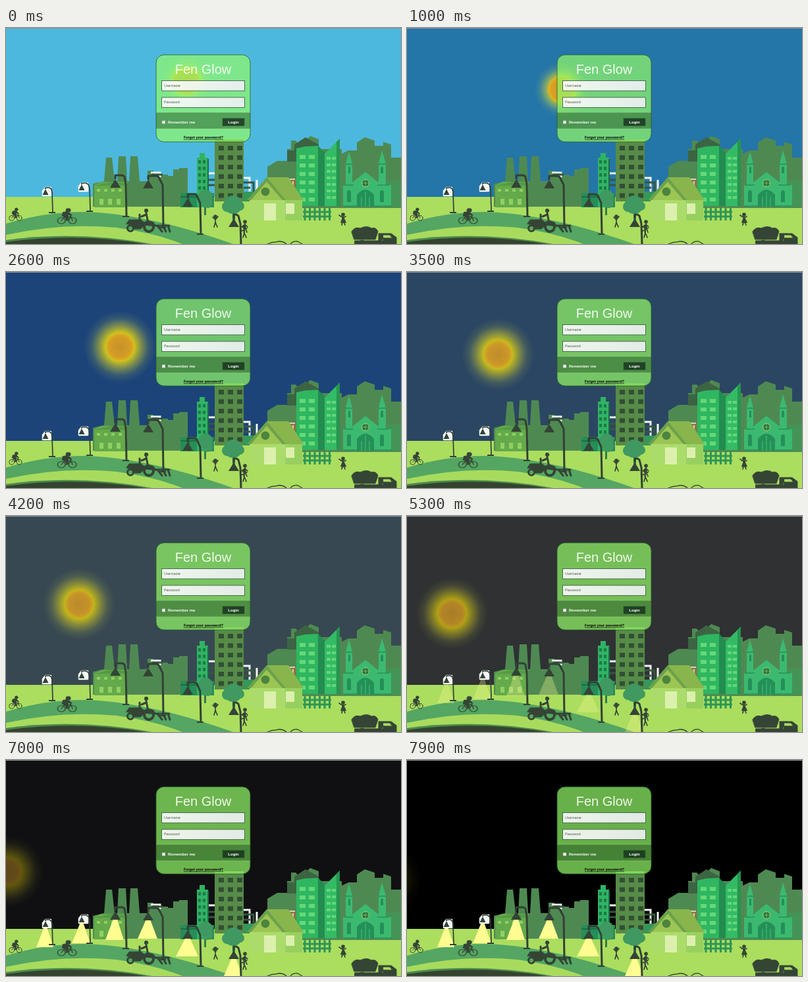
An HTML page for the animation above (8000 ms loop, 600 by 330 pixels).

```html
<!DOCTYPE html>
<html lang="en">
<head>
<meta charset="utf-8">
<title>Day and night login</title>
<style>
html, body { margin: 0; width: 100%; height: 100%; overflow: hidden; background: #000; }
svg { display: block; width: 600px; height: 330px; }
text { font-family: "Liberation Sans", Arial, sans-serif; }
.bold { font-weight: bold; font-size: 6px; }
</style>
</head>
<body>
<svg viewBox="0 0 600 330" xmlns="http://www.w3.org/2000/svg">
  <defs>
    <radialGradient id="glowFill">
      <stop offset=".4" stop-color="#ffe900" stop-opacity=".8"/>
      <stop offset=".6" stop-color="#f4e51c" stop-opacity=".45"/>
      <stop offset=".8" stop-color="#d8e040" stop-opacity=".14"/>
      <stop offset="1" stop-color="#d8e040" stop-opacity="0"/>
    </radialGradient>
    <radialGradient id="core">
      <stop offset="0" stop-color="#cf9526"/>
      <stop offset=".75" stop-color="#dca023"/>
      <stop offset="1" stop-color="#e9b51c"/>
    </radialGradient>
    <linearGradient id="field" x2="1" y2="0">
      <stop offset="0" stop-color="#fbfcfc"/>
      <stop offset="1" stop-color="#eef0f4"/>
    </linearGradient>
  </defs>

  <rect id="sky" width="600" height="330"/>
  <g id="sun">
    <circle id="glow" fill="url(#glowFill)"/>
    <circle r="21" fill="url(#core)"/>
  </g>

  <path d="M0 258H600V330H0Z" fill="#abdd5f"/>
  <g id="skyline" fill="#4f8952">
    <path d="M132 273V238L149 234L152 198H161L165 234H169L171 196H182L184 234H187L189 196H200L203 234H215V218H224V224H246V226H254V216H263V214H276V273Z"/>
    <path d="M397 275V212L412 203H427V185H433V172H440L447 180L462 165L475 170V185H510V192L520 187H533V175L545 167L560 172V180H573V174L585 178V198H600V275Z"/>
    <path d="M427 204V187H438V178L455 167L475 178V186H443V204Z" fill="#3c6442"/>
  </g>

  <g id="hills">
    <path d="M0 299Q58 281 118 281Q213 283 345 330H0Z" fill="#54a662"/>
    <path d="M0 316Q85 297 168 305Q226 313 268 330H0Z" fill="#a8db5d"/>
    <path d="M0 324Q108 309 222 330H0Z" fill="#4b8a4c"/>
    <path d="M0 327Q105 312 212 330H0Z" fill="#34432f"/>
  </g>

  <g id="factory">
    <path d="M134 274V240L145 235H184V274Z" fill="#64aa4b"/>
    <path d="M134 241L160 235L184 237V241Z" fill="#549a45"/>
    <g id="factoryWindows" fill="#92cf62"></g>
  </g>

  <g id="plant">
    <path d="M220 221H234V228M290 222H318M360 229H370V250M381 232V250" fill="none" stroke="#f4f8f4" stroke-width="3"/>
    <path d="M221 224H238M300 232H318M300 240H318M360 236H376V255M360 244H371" fill="none" stroke="#36563f" stroke-width="3"/>
    <path d="M290 274V198H294V191H302V198H307V274Z" fill="#30b364"/>
    <path d="M265 274V252H290V274ZM307 252H316V274H307Z" fill="#278d58"/>
    <path d="M265 258H316M278 252V274M307 200V270" stroke="#1c6d47" stroke-width="2"/>
    <g id="plantWindows" fill="#1c7a4a"></g>
    <path d="M361 265V250H383V265Z" fill="#33985a"/>
  </g>

  <g id="tower">
    <path d="M317 265V170H361V265Z" fill="#578b48"/>
    <g id="towerWindows" fill="#314f34"></g>
  </g>

  <g id="trees" fill="#3f9960">
    <path d="M301 265H304V286H301ZM344 278H348V294H344Z" fill="#357d4a"/>
    <circle cx="303" cy="258" r="11"/><circle cx="306" cy="267" r="8"/>
    <circle cx="345" cy="270" r="14"/><circle cx="336" cy="273" r="8"/><circle cx="355" cy="272" r="7"/>
  </g>

  <g id="offices">
    <path d="M441 272V184L454 181L474 180V272Z" fill="#2fb660"/>
    <path d="M474 180L484 190V272H474Z" fill="#238c4f"/>
    <path d="M484 272V192L507 169V272Z" fill="#34bb66"/>
    <path d="M502 174L507 169V272H502Z" fill="#26954f"/>
    <g id="officeWindows" fill="#66d878"></g>
  </g>

  <g id="church">
    <path d="M578 273V233H600V273Z" fill="#439456"/>
    <path d="M512 273V240H516V207L521 189L526 207V236L546 220L566 236V207L571 187L577 207V240H585V273Z" fill="#3cb970"/>
    <path d="M516 208H527M565 208H577M514 240H528M564 240H581M512 272H586" stroke="#249058" stroke-width="1.500"/>
    <path d="M520 222V213Q521.500 210 523 213V222ZM569 222V213Q571 210 573 213V222ZM518 266V250Q521 245 524 250V266ZM568 266V250Q571 245 574 250V266ZM533 273V255Q546 239 559 255V273Z" fill="#249058"/>
    <path d="M540 273V258M546 273V250M552 273V258" stroke="#48c376" stroke-width="1"/>
    <circle cx="546" cy="237" r="5.500" fill="#2b6f42" stroke="#a5d56e"/>
    <path d="M546 232V242M541 237H551" stroke="#87d56e" stroke-width=".7"/>
  </g>

  <g id="house">
    <path d="M427 230H440V245H427Z" fill="#967044"/>
    <path d="M428 231H439M430 234V241M436 234V241" stroke="#eff0df" stroke-width="1.500"/>
    <path d="M370 294V260L396 229L424 261H450V294Z" fill="#abdc6b"/>
    <path d="M424 262H450V294H424Z" fill="#98d05f"/>
    <path d="M396 228H429L452 263H424Z" fill="#88b64d"/>
    <path d="M368 263L396 229L424 263Z" fill="#9cc653"/>
    <path d="M366 263L396 228L425 263H420L396 235L372 263Z" fill="#6ca14c"/>
    <circle cx="394" cy="250" r="6.500" fill="#4d843e"/>
    <path d="M392 268H410V294H392ZM425 268H438V284H425Z" fill="#dcf0ad"/>
  </g>
  <path id="fence" fill="none" stroke="#2d9656" stroke-width="3"/>

  <g id="figures" fill="#354535" stroke="#354535" stroke-linecap="round" stroke-linejoin="round">
    <g id="riders" stroke-width="1.100"></g>
    <g id="tractor" stroke-width="1">
      <circle cx="189" cy="306" r="4.500" fill="none" stroke-width="3"/>
      <circle cx="217" cy="304" r="7" fill="none" stroke-width="4"/>
      <path d="M183 299L187 293H205L210 297L215 294L224 297L228 303L211 301L204 307H194L190 301Z"/>
      <circle cx="213" cy="279" r="2.700"/>
      <path d="M213 283L215 293M213 285L206 288M203 285V293" fill="none" stroke-width="3"/>
      <path d="M225 302H248M230 302L237 311M238 302L243 311M246 302L249 311" fill="none" stroke-width="3"/>
    </g>
    <g id="people" stroke-width="1.700"></g>
    <g id="truck">
      <path d="M525 311Q530 303 538 306Q548 301 555 306Q562 304 565 311L561 323H529Z"/>
      <path d="M530 325H566V314H585L593 320V330H530Z"/>
      <path d="M573 316H583L587 321H573Z" fill="#a9db60"/>
      <circle cx="541" cy="328" r="4"/><circle cx="577" cy="328" r="4"/>
      <circle cx="572" cy="324" r="1.300" fill="#9bc65a"/>
    </g>
    <path d="M397 330Q404 327 410 327Q419 324 426 330M432 330Q436 325 443 326L450 330" fill="none" stroke-width="1.300"/>
  </g>

  <g id="beams" fill="#fffd91"></g>
  <g id="lamps"></g>

  <g id="card">
    <rect x="228" y="41" width="143" height="133" rx="12" fill="#94fb69" fill-opacity=".7" stroke="#235d28" stroke-opacity=".8"/>
    <rect x="228" y="129" width="143" height="25" fill="#1c4a1d" fill-opacity=".45"/>
    <path d="M228 129H371M228 154H371" stroke="#a9df91" stroke-opacity=".5" stroke-width=".8"/>
    <text x="299.500" y="70" font-size="20" text-anchor="middle" fill="#fff" fill-opacity=".9">Fen Glow</text>
    <g fill="url(#field)" fill-opacity=".9" stroke="#3f5f45" stroke-width=".9">
      <rect x="236.500" y="80.500" width="126" height="15.500"/>
      <rect x="236.500" y="106" width="126" height="15.500"/>
    </g>
    <g font-size="5.400" fill="#555">
      <text x="240" y="90">Username</text>
      <text x="240" y="115.300">Password</text>
    </g>
    <rect x="237" y="141.500" width="5" height="5" rx=".7" fill="#f4f4f4" stroke="#666" stroke-width=".4"/>
    <text class="bold" x="246" y="145.500" fill="#f7faf4">Remember me</text>
    <rect x="329" y="138" width="33" height="11.500" fill="#12291a" fill-opacity=".75" stroke="#315d32" stroke-width=".6"/>
    <text class="bold" x="345.500" y="145.500" text-anchor="middle" fill="#fff">Login</text>
    <text x="300" y="169" text-anchor="middle" font-size="5.400" font-weight="bold" text-decoration="underline">Forgot your password?</text>
  </g>
  <path d="M0 .5H600" stroke="#87949b"/>
</svg>

<script>
const LOOP = 8000, STEP = 100;
const el = id => document.getElementById(id);
const fill = (id, markup) => { el(id).innerHTML = markup; };
const range = n => [...Array(n).keys()];

// A regular grid of small rectangles.
const grid = (x, y, cols, rows, dx, dy, w, h) =>
  range(cols * rows).map(i =>
    `<rect x="${x + i % cols * dx}" y="${y + Math.floor(i / cols) * dy}" width="${w}" height="${h}"/>`).join("");

fill("factoryWindows", grid(138, 246, 4, 1, 11, 9, 5, 4) + grid(142, 261, 3, 1, 13, 9, 6, 9));
fill("plantWindows", grid(292, 202, 2, 5, 7, 10, 4, 5));
fill("towerWindows", grid(323, 180, 3, 6, 14, 14.5, 8, 7));
fill("officeWindows", grid(446, 194, 2, 6, 14, 13, 9, 6) + grid(487, 197, 2, 7, 8, 10, 6, 4));

el("fence").setAttribute("d", "M451 281H494M451 288H494" +
  range(6).map(i => `M${454 + i * 7.5} 275V294`).join(""));

const rider = (x, y, sx, sy) => `<g transform="translate(${x} ${y}) scale(${sx} ${sy})">
  <g fill="none"><circle cx="-6" cy="5" r="4.500"/><circle cx="7" cy="5" r="4.500"/>
  <path d="M-6 5L-2-1H5L7 5M-2-1L1 5L5-1M5-4V-1"/></g>
  <path d="M-4-7L1-8L6-3L1-4L2 1L0 5L-1 0L-5-2Z"/><circle cx="2" cy="-10" r="2.500"/></g>`;
fill("riders", rider(14, 286, .88, .88) + rider(92, 289, 1.3, 1.05));

const person = (x, y, arms) => `<g transform="translate(${x} ${y})">
  <circle r="2"/><path d="M0 3V9L-2 16M0 9L3 16M${arms}" fill="none"/></g>`;
fill("people", person(318, 288, "-4 1L0 5L4 0") + person(363, 296, "-5 8L0 4L4 8") +
  person(362, 304, "-4 6L0 4L4 2") + person(512, 285, "-6 1L0 5L4 3") +
  `<path d="M509 297L512 289L516 297Z"/>`);

// Head x/y, arm end x, pole foot x/y, beam base y, beam half width, white fringe.
const lamps = [
  [60, 246, 69, 71, 281, 286, 13, true],
  [115, 239, 125, 128, 279, 280, 14, true],
  [166, 231, 180, 183, 287, 275, 14, false],
  [216, 232, 232, 239, 304, 273, 15, false],
  [276, 260, 290, 296, 314, 300, 17, false],
  [346, 291, 353, 357, 330, 330, 14, false]
];
fill("beams", lamps.map(([x, y, , , , base, half]) =>
  `<path d="M${x - 2} ${y + 9}H${x + 2}L${x + half - 1} ${base}H${x - half - 1}Z"/>`).join(""));
fill("lamps", lamps.map(([x, y, top, foot, ground, , , fringe]) => {
  const size = fringe ? 4.5 : 8, drop = fringe ? 9 : 13, arm = y - (fringe ? 2 : 6);
  const halo = fringe ? `<path d="M${x - 4} ${y + 10}V${y + 3}L${x} ${arm}H${top - 1}V${y + 10}Z"
    fill="#f5faf7" stroke="#f5faf7" stroke-width="2.500" stroke-linejoin="round"/>` : "";
  return `${halo}<path d="M${x} ${y}V${arm}H${top - 3}L${top} ${arm + 2}L${foot - 1} ${y + drop * .6}L${foot} ${ground}"
    fill="none" stroke="#314134" stroke-width="${fringe ? 1.7 : 3}" stroke-linejoin="round"/>
    <path d="M${x} ${y}L${x + size} ${y + drop}H${x - size}ZM${foot - 6} ${ground}H${foot + 4}V${ground + 2}H${foot - 6}Z" fill="#344336"/>`;
}).join(""));

const skyKeys = [
  [0, 77, 184, 222], [1000, 36, 117, 168], [2600, 28, 68, 121],
  [4200, 55, 72, 82], [5300, 47, 49, 51], [6200, 31, 31, 34],
  [7900, 0, 0, 0], [8000, 0, 0, 0]
];
const sunKeys = [[0, 1], [2600, .96], [4200, .86], [5300, .76], [6200, .6], [8000, .18]];
const glowKeys = [[0, 38], [1000, 42], [2600, 55], [8000, 55]];

function blend(keys, t) {
  const next = Math.max(1, keys.findIndex(k => k[0] > t));
  const a = keys[next - 1], b = keys[next];
  const p = (t - a[0]) / (b[0] - a[0]);
  return a.slice(1).map((v, i) => v + (b[i + 1] - v) * p);
}

function draw(t) {
  el("sky").setAttribute("fill", `rgb(${blend(skyKeys, t).map(Math.round)})`);
  el("sun").setAttribute("transform", `translate(${274 - .0388 * t} ${81 + .0128 * t})`);
  el("sun").setAttribute("opacity", blend(sunKeys, t)[0]);
  el("glow").setAttribute("r", blend(glowKeys, t)[0]);
  el("beams").setAttribute("opacity", Math.min(1, Math.max(0, (t - 5000) / 1000)));
}

const start = performance.now();
function tick() {
  const t = (performance.now() - start) % LOOP;
  draw(Math.floor(t / STEP) * STEP);
  requestAnimationFrame(tick);
}
draw(0);
requestAnimationFrame(tick);
</script>
</body>
</html>
```
